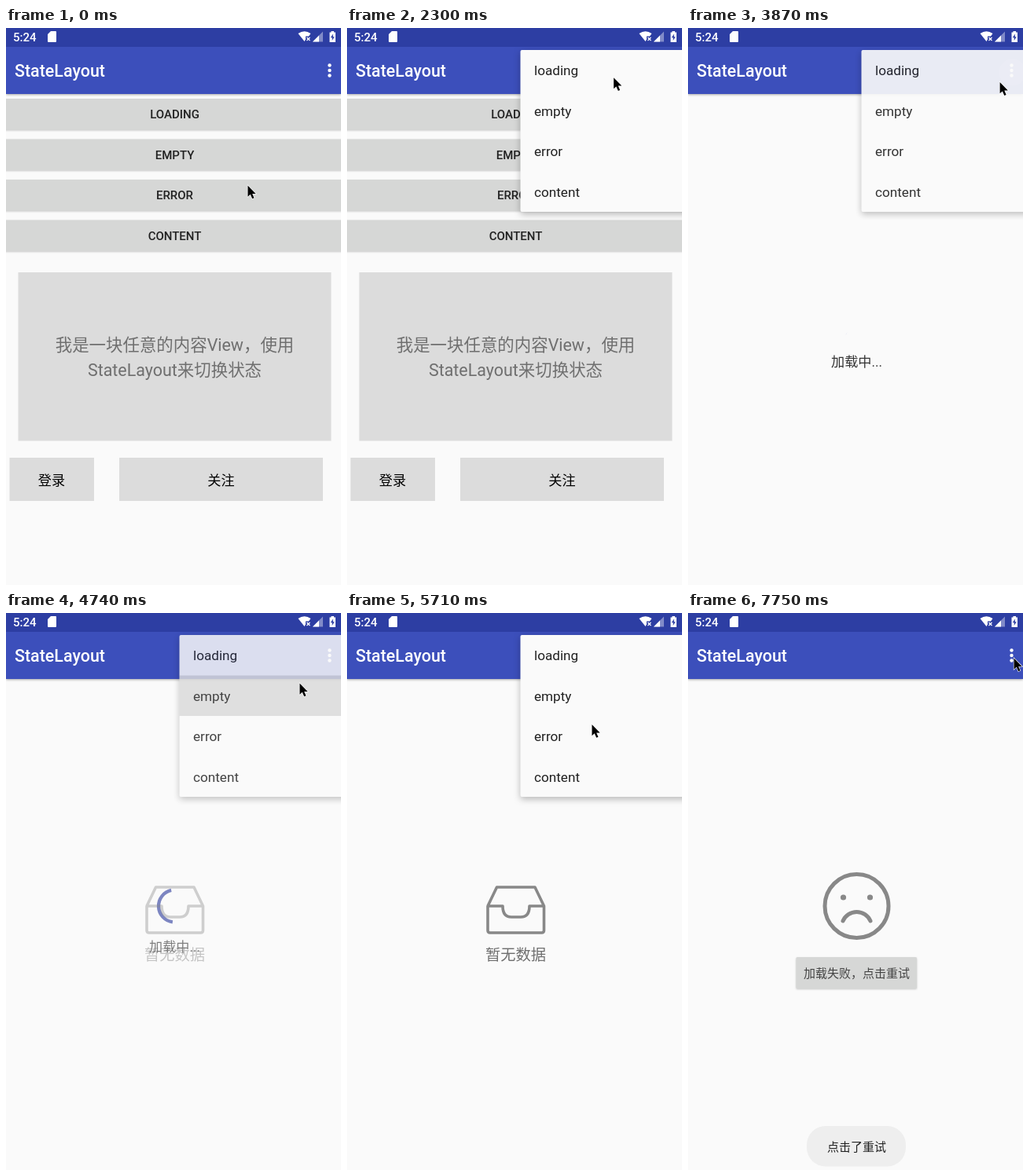
Recreate the animation shown at these times as an HTML page. Size 426 by 709 pixels, loop 8 s.

```html
<!DOCTYPE html>
<html lang="zh-CN">
<head>
<meta charset="utf-8">
<style>
html, body { margin: 0; width: 100%; height: 100%; overflow: hidden; background: #fafafa; }
svg { display: block; width: 426px; height: 709px; font: 400 17.15px Roboto, "Noto Sans CJK SC", "Noto Sans CJK", sans-serif; }
.mid { text-anchor: middle; }
.btn { fill: #d6d7d6; filter: drop-shadow(0 1.2px 1px #0003); }
.caps { font-size: 15px; font-weight: 500; fill: #212121; }
.line { fill: none; stroke: #888; }
</style>
</head>
<body>
<svg viewBox="0 0 426 709">
  <defs><clipPath id="reveal"><rect id="hole"/></clipPath></defs>
  <rect width="426" height="709" fill="#fafafa"/>

  <g id="content" class="mid">
    <g id="buttons" class="caps"></g>
    <g fill="#dcdcdc">
      <rect x="15.5" y="311" width="398" height="214.5"/>
      <rect x="4.5" y="547" width="107.5" height="55"/>
      <rect x="144" y="547" width="259" height="55"/>
    </g>
    <g fill="#6f6f6f" font-size="21.45">
      <text x="214.5" y="411">我是一块任意的内容View，使用</text>
      <text x="214.5" y="443">StateLayout来切换状态</text>
    </g>
    <text x="58" y="581.5">登录</text>
    <text x="273.5" y="581.5">关注</text>
  </g>

  <g id="loading" class="mid">
    <path id="arc" fill="none" stroke="#303f9f" stroke-width="4.3"/>
    <text x="214.5" y="430.5" fill="#333">加载中...</text>
  </g>

  <g id="empty" class="mid">
    <path class="line" stroke-width="3.6" stroke-linejoin="round" d="M179 373L190.5 349H239L250.500 373V404Q250.500 407 247.500 407H182Q179 407 179 404V373H198Q198 387 209 387H221Q232 387 232 373H250.500"/>
    <text x="214.5" y="442" font-size="19.3" fill="#6f6f6f">暂无数据</text>
  </g>

  <g id="error" class="mid">
    <g class="line" stroke-width="5">
      <circle cx="214.500" cy="373" r="40.5"/>
      <path stroke-linecap="round" d="M197 392A19 19 0 0 1 232 392"/>
    </g>
    <g fill="#888"><circle cx="197.500" cy="362" r="3.6"/><circle cx="231.500" cy="362" r="3.6"/></g>
    <rect class="btn" x="137.500" y="438" width="153.500" height="40" rx="1.500"/>
    <rect id="press" x="137.500" y="438" width="153.500" height="40" rx="1.500"/>
    <text x="214.500" y="463.600" font-size="15" fill="#444">加载失败，点击重试</text>
  </g>

  <g id="toast" class="mid">
    <rect x="151" y="653" width="126" height="51.500" rx="24" fill="#eee"/>
    <text x="214.500" y="684.500" font-size="15" fill="#222">点击了重试</text>
  </g>

  <rect width="426" height="84" fill="#3c4fbb" style="filter:drop-shadow(0 1.500px 1.500px #0005)"/>
  <rect width="426" height="24" fill="#2d3ea3"/>
  <g fill="#fff">
    <text x="9" y="17" font-size="15" font-weight="500">5:24</text>
    <path d="M57 4H63Q64 4 64 5V17Q64 18 63 18H54Q53 18 53 17V8Z"/>
    <path d="M371.500 7Q379.500 1.500 387.500 7L385 10.500H381V14.500L379.500 17Z"/>
    <path d="M382.500 12L386.500 16M386.500 12L382.500 16" stroke="#fff" stroke-width="1.300"/>
    <path d="M390 17.500L403 4.500V17.500Z" opacity=".4"/>
    <path d="M390 17.500L398 9.500V17.500Z"/>
    <path d="M411.500 5.500H413.500V4H417V5.500H419V18H411.500Z"/>
    <path d="M415.800 7.500L412.800 12.300H414.700V16L417.700 11.200H415.800Z" fill="#2d3ea3"/>
    <text x="11" y="62" font-size="21.450" font-weight="500">StateLayout</text>
    <circle id="ripple" cx="412.500" cy="56.500" r="17"/>
    <circle cx="411.500" cy="47.500" r="2.200"/><circle cx="411.500" cy="54" r="2.200"/><circle cx="411.500" cy="60.500" r="2.200"/>
  </g>

  <g clip-path="url(#reveal)">
    <g id="menu">
      <rect x="220.500" y="28" width="220" height="206" rx="2" fill="#fafafa" style="filter:drop-shadow(0 3px 4px #0004)"/>
      <rect id="row" x="220.500" width="206" height="51.500"/>
      <g id="items" fill="#212121"></g>
    </g>
  </g>

  <path id="cursor" d="M0 0V14.200L3.200 11.300L5.700 16.800L8 15.800L5.700 10.400H10.200Z" stroke="#fff" stroke-width="1.200" paint-order="stroke"/>
</svg>
<script>
const $ = id => document.getElementById(id);
const clamp = v => Math.max(0, Math.min(1, v));
const ramp = (t, start, length) => clamp((t - start) / length);
const fade = (id, v) => $(id).setAttribute('opacity', v);

const LOOP = 8000, STEP = 88, PITCH = 51.5, FADE = 290;
const TO_LOADING = 2543, TO_EMPTY = 4642, TO_ERROR = 6309, RETRY = 7090;

$('buttons').innerHTML = ['LOADING', 'EMPTY', 'ERROR', 'CONTENT'].map((s, i) =>
  `<rect class="btn" x="-4" y="${90 + i * PITCH}" width="434" height="39.5"/>
   <text x="214.5" y="${115.3 + i * PITCH}">${s}</text>`).join('');
$('items').innerHTML = ['loading', 'empty', 'error', 'content'].map((s, i) =>
  `<text x="238" y="${60 + i * PITCH}">${s}</text>`).join('');

// Each visit to the menu: overflow press, item press, selection, row.
const visits = [
  { press: 1580, tap: 2480, pick: TO_LOADING, row: 0 },
  { press: 3610, tap: 4520, pick: TO_EMPTY, row: 1 },
  { press: 5350, tap: 6220, pick: TO_ERROR, row: 2 }
];

// Pointer stops: time, x, y
const path = [
  [88, 307.5, 200.5], [440, 368, 118], [792, 410, 57], [1144, 410, 57], [1320, 411, 57.5],
  [1720, 411, 57.5], [2376, 328, 64], [2552, 328, 64], [2816, 353.5, 66], [3256, 411, 58],
  [3740, 411, 58], [4300, 350, 105], [4642, 350, 105], [4752, 373.5, 89.5], [5090, 404, 59],
  [5176, 408, 60], [5368, 408, 60], [5720, 311.5, 142], [5984, 277, 160], [6309, 277, 160],
  [6512, 268.5, 190], [6952, 226, 454], [7128, 226, 454], [7744, 414.5, 57.5]
];

function pointer(t) {
  const i = path.findIndex(k => k[0] > t);
  if (i < 0) return path[path.length - 1].slice(1);
  if (!i) return path[0].slice(1);
  const a = path[i - 1], b = path[i], p = ramp(t, a[0], b[0] - a[0]);
  return [1, 2].map(n => a[n] + (b[n] - a[n]) * p);
}

// Ease over half a cycle: curve through (0,0) (.4,0) (.2,1) (1,1).
function ease(x) {
  let lo = 0, hi = 1;
  for (let i = 0; i < 20; i++) {
    const s = (lo + hi) / 2, u = 1 - s;
    if (1.2 * u * u * s + .6 * u * s * s + s * s * s < x) lo = s; else hi = s;
  }
  return lo * lo * (3 - 2 * lo);
}

function spinner(t) {
  const age = Math.max(0, t - TO_LOADING), p = age / 1333 % 1;
  const turn = -112 + age * .1813 + p * 90;
  const from = turn + 270 * ease(clamp(p * 2 - 1));
  const to = turn + 270 * ease(clamp(p * 2)) + .1;
  const at = deg => {
    const a = deg * Math.PI / 180;
    return `${214.5 + 20.5 * Math.cos(a)} ${373 + 20.5 * Math.sin(a)}`;
  };
  $('arc').setAttribute('d', `M${at(from)}A20.5 20.5 0 ${to - from > 180 ? 1 : 0} 1 ${at(to)}`);
}

function menu(t) {
  const v = visits.find(v => t < v.pick + 320) || visits[2];
  const open = ramp(t, v.press + 70, 210);
  const p = 1 - (1 - open) ** 2;
  const gone = ramp(t, v.pick, 305) ** 1.8;
  const hole = { x: 426 - 230 * p, y: 24, width: 230, height: 20 + 225 * p };
  for (const k in hole) $('hole').setAttribute(k, hole[k]);
  fade('menu', open * (1 - gone));
  $('row').setAttribute('y', 28 + v.row * PITCH);
  fade('row', .13 * ramp(t, v.tap, 100));
  fade('ripple', t < v.press ? 0 : .2 * (1 - ramp(t, v.press + 150, 250)));
}

function draw(now) {
  const t = Math.floor((now % LOOP + 14) / STEP) * STEP;
  const toLoading = ramp(t, TO_LOADING, FADE);
  const toEmpty = ramp(t, TO_EMPTY, FADE);
  const toError = ramp(t, TO_ERROR, FADE);
  fade('content', 1 - toLoading);
  fade('loading', toLoading * (1 - toEmpty));
  fade('empty', toEmpty * (1 - toError));
  fade('error', toError);
  fade('press', .1 * ramp(t, RETRY - 20, 50) * (1 - ramp(t, RETRY + 100, 300)));
  fade('toast', ramp(t, RETRY + 60, 250));
  spinner(t);
  menu(t);
  $('cursor').setAttribute('transform', `translate(${pointer(t)})`);
}

const start = performance.now();
(function tick() {
  draw(performance.now() - start);
  requestAnimationFrame(tick);
})();
</script>
</body>
</html>
```
